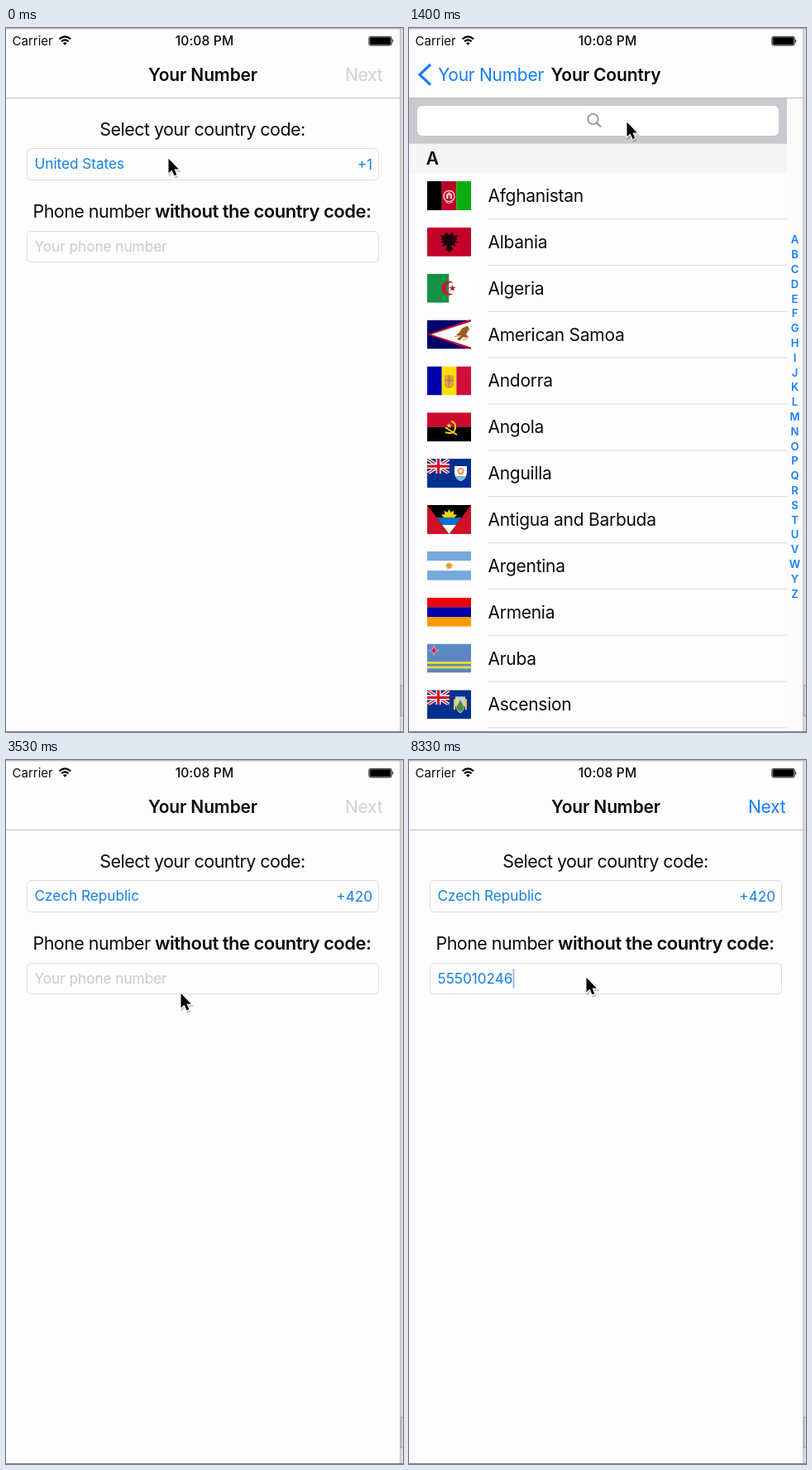
Recreate the animation shown at these times as an HTML page. Size 480 by 850 pixels, loop 8390 ms.

```html
<!DOCTYPE html>
<html lang="en">
<head>
<meta charset="utf-8">
<title>Country picker</title>
<style>
html, body { margin: 0; width: 100%; height: 100%; overflow: hidden; background: #fefdfe; }
svg { display: block; width: 100vw; height: 100vh; }
text { font-family: Inter, "Liberation Sans", sans-serif; fill: #0b0b0c; white-space: pre; }
.row { font-size: 21px; letter-spacing: -.28px; }
.title { font-size: 21px; font-weight: 600; letter-spacing: -.15px; text-anchor: middle; }
.label { font-size: 21.5px; letter-spacing: -.55px; }
.bold { font-size: 22px; font-weight: 600; letter-spacing: -.5px; }
.field { font-size: 17.15px; }
.blue { fill: #147efb; }
.value { fill: #1480e4; }
.end { text-anchor: end; }
.mid { text-anchor: middle; }
.index { font-size: 13px; font-weight: 600; text-anchor: middle; fill: #147efb; }
.line { stroke: #dfe0e4; stroke-width: 1.2; }
</style>
</head>
<body>
<svg viewBox="0 0 480 850" preserveAspectRatio="none">
  <defs>
    <clipPath id="view"><rect y="84" width="477" height="766"/></clipPath>
    <clipPath id="flagBox"><rect width="53" height="35"/></clipPath>
    <clipPath id="jackBox"><rect width="27" height="18"/></clipPath>
    <g id="jack" clip-path="url(#jackBox)">
      <path d="M0 0L27 18M27 0L0 18" stroke="#fff" stroke-width="4"/>
      <path d="M0 0L27 18M27 0L0 18" stroke="#cf142b" stroke-width="1.4"/>
      <path d="M13.5 0V18M0 9H27" stroke="#fff" stroke-width="6"/>
      <path d="M13.5 0V18M0 9H27" stroke="#cf142b" stroke-width="3.4"/>
    </g>
  </defs>
  <rect width="480" height="850" fill="#fefdfe"/>

  <g clip-path="url(#view)">
    <g id="form">
      <text class="label mid" x="237.5" y="130">Select your country code:</text>
      <rect x="25.5" y="145.5" width="425" height="38" rx="5" fill="none" stroke="#dcdee2"/>
      <text id="country" class="field value" x="34.5" y="170"></text>
      <text id="code" class="field value end" x="443" y="170.5"></text>
      <text class="label" x="32.5" y="229">Phone number</text>
      <text class="bold end" x="441.5" y="229">without the country code:</text>
      <rect x="25.5" y="245.5" width="425" height="37" rx="5" fill="none" stroke="#dcdee2"/>
      <text id="hint" class="field" x="34.5" y="270" style="fill:#c9c9ce">Your phone number</text>
      <text id="phone" class="field" x="34.5" y="270"></text>
      <rect id="phoneCaret" y="252" width="2" height="23" fill="#426fd9"/>
    </g>
    <rect id="dim" y="84" width="477" height="766"/>

    <g id="panel">
      <rect y="84" width="477" height="766" fill="#fefdfe"/>
      <rect x="457" y="84" width="20" height="766" fill="#fcfcfd"/>
      <rect id="bar" y="84" height="55.5" fill="#c9c8ce"/>
      <rect id="box" x="10" y="94" height="36" rx="6" fill="#fff"/>
      <g id="lens" fill="none" stroke="#8e8e93" stroke-width="1.5">
        <circle cx="-1.5" cy="110" r="6.2"/><path d="M3 114.5L8 119.5" stroke-width="1.9"/>
      </g>
      <text id="query" class="field" x="47" y="117.5"></text>
      <rect id="queryCaret" y="99" width="2" height="24" fill="#426fd9"/>
      <g id="clear">
        <circle cx="346.5" cy="112" r="9" fill="#8e8e93"/>
        <path d="M343 108.5l7 7m0-7l-7 7" stroke="#fff" stroke-width="1.7"/>
      </g>
      <text id="cancel" class="row blue" x="380" y="118">Cancel</text>
      <path d="M0 139.5H457" stroke="#d4d4d8"/>
      <rect y="140" width="457" height="35" fill="#f5f5f6"/>
      <g id="all"></g>
      <g id="found"></g>
    </g>
  </g>

  <rect width="477" height="84" fill="#fdfdfe"/>
  <path d="M0 84.5H477" stroke="#bcbcc0"/>
  <text id="title" class="title" y="63.5">Your Number</text>
  <text id="title2" class="title" y="63.5">Your Country</text>
  <text id="back" class="row blue" y="63.5">Your Number</text>
  <path id="chevron" d="M26 44L13 56.3L26 68.6" fill="none" stroke="#147efb" stroke-width="3.2"/>
  <text id="next" class="row end" x="455.3" y="63.5">Next</text>

  <text x="7.6" y="21" font-size="15">Carrier</text>
  <text class="mid" x="240" y="21" font-size="15.6" font-weight="500" letter-spacing=".15">10:08 PM</text>
  <g fill="none" stroke="#000" stroke-width="2.1">
    <path d="M64.5 13.4Q71.3 7.2 78.1 13.4M67 16.3Q71.3 12.4 75.6 16.3"/>
    <path d="M71.3 20.8L68.9 18.2Q71.3 16.2 73.7 18.2Z" fill="#000" stroke="none"/>
  </g>
  <rect x="438.8" y="10.3" width="27.4" height="10.8" rx="2" fill="#777" stroke="#333" stroke-width=".9"/>
  <rect x="440.3" y="11.6" width="24.4" height="8.2" rx=".8"/>
  <path d="M467.3 13.3Q469.4 15.7 467.3 18.1Z"/>

  <rect x="477" width="3" height="850" fill="#dedee0"/>
  <path d="M476.8 0V850" stroke="#b9b9bc" stroke-width="1.2"/>
  <rect x="477.4" y="793.5" width="4" height="37" fill="#d2d2d4" stroke="#a5a5a8"/>
  <path d="M0 .7H480" stroke="#bdbdc0" stroke-width="1.4"/>
  <path d="M0 849.5H480" stroke="#86868a"/>

  <g id="cursor">
    <path d="M1.5 3V20.5L5.5 16.8L8.5 23.5L11.3 22.3L8.5 15.8H13.8Z" opacity=".22" stroke="#000" stroke-width="2"/>
    <path d="M.5 .8V18.3L4.5 14.6L7.5 21.3L10.3 20.1L7.5 13.6H12.8Z" stroke="#fff" stroke-width="2.4" stroke-linejoin="round" paint-order="stroke"/>
  </g>
</svg>
<script>
const el = {};
document.querySelectorAll('[id]').forEach(n => el[n.id] = n);
const set = (n, attrs) => { for (const k in attrs) n.setAttribute(k, attrs[k]); };
const clamp = v => Math.max(0, Math.min(1, v));
const mix = (a, b, p) => a + (b - a) * p;

// Flags, drawn on 53 x 35
const rect = (x, y, w, h, c) => `<rect x="${x}" y="${y}" width="${w}" height="${h}" fill="${c}"/>`;
const path = (d, c, more = '') => `<path d="${d}" fill="${c}" ${more}/>`;
const dot = (x, y, r, c, more = '') => `<circle cx="${x}" cy="${y}" r="${r}" fill="${c}" ${more}/>`;
const stroke = (c, w) => `stroke="${c}" stroke-width="${w}"`;
const bands = (...c) => c.map((v, i) => rect(0, i * 35 / c.length, 53, 35 / c.length + .1, v)).join('');
const pales = (...c) => c.map((v, i) => rect(i * 53 / c.length, 0, 53 / c.length + .1, 35, v)).join('');
const star = (x, y, r, n, c, inner = .4) => {
  let d = '';
  for (let i = 0; i < 2 * n; i++) {
    const a = Math.PI * i / n - Math.PI / 2, k = i % 2 ? r * inner : r;
    d += (i ? 'L' : 'M') + (x + k * Math.cos(a)).toFixed(2) + ' ' + (y + k * Math.sin(a)).toFixed(2);
  }
  return path(d + 'Z', c);
};
const ensign = shield => rect(0, 0, 53, 35, '#00308f') + '<use href="#jack"/>' + shield;

const flags = {
  'Afghanistan': pales('#000', '#be0027', '#0bae0f') +
    dot(26.5, 18, 6.6, 'none', stroke('#eec6cb', 1.5)) + path('M23 21V16L26.5 13L30 16V21Z', '#eec6cb') +
    rect(25.5, 17, 2, 4, '#be0027') + path('M22 25Q26.5 28 31 25', 'none', stroke('#eec6cb', 1)),
  'Albania': rect(0, 0, 53, 35, '#c20029') +
    path('M26.5 9L23 6L20 9L24 11L16 9L18 13L16 14L19 16L16 18L20 19L18 23L24 21L22 27L26.5 30L31 27L29 21L35 23L33 19L37 18L34 16L37 14L35 13L37 9L29 11L33 9L30 6Z', '#200008'),
  'Algeria': pales('#149048', '#fff') +
    path('M32 11.2A8.6 8.6 0 1 0 32 23.8A6.8 6.8 0 1 1 32 11.2Z', '#d21034') + star(30.5, 17.5, 4.4, 5, '#d21034'),
  'American Samoa': rect(0, 0, 53, 35, '#00006b') + path('M0 17.5L53 -1V36Z', '#c0102f') + path('M5 17.5L53 2V33Z', '#fff') +
    path('M35 18L39 15L42 10L49 7L51 11L47 17L50 21L43 21L39 25L36 23L40 20Z', '#9b5a22') +
    path('M33 20L42 19M43 24L49 22', 'none', stroke('#d9a33c', 1.3)),
  'Andorra': pales('#0000a8', '#fedf00', '#d0103a') + rect(21, 11, 11, 12, '#d9a04e') +
    path('M21 17H32M26.5 11V25M22 23Q26.5 28 31 23', 'none', stroke('#b87839', 1.4)),
  'Angola': bands('#cc092f', '#000') +
    path('M29 10.5A7.5 7.5 0 0 1 28 25L22 24M22 18L36 27', 'none', stroke('#f7d117', 2)) + star(26.5, 16, 3.6, 5, '#f7d117'),
  'Anguilla': ensign(path('M33 9H48V17Q47 25 40.5 27Q34 25 33 17Z', '#fff') + path('M34 21H47Q45 25 40.5 26.5Q36 25 34 21Z', '#72bfd5') +
    dot(40.5, 15, 3.2, 'none', stroke('#f08a45', 1.9))),
  'Antigua and Barbuda': rect(0, 0, 53, 35, '#ce1126') + path('M0 0H53L26.5 35Z', '#000') +
    star(26.5, 15, 10, 10, '#fcd116', .65) + path('M11.4 15H41.6L34 25H19Z', '#0072c6') + path('M18.2 24H34.8L26.5 35Z', '#fff'),
  'Argentina': bands('#75aadb', '#fff', '#75aadb') + star(26.5, 17.5, 5, 12, '#e8b54a', .65) + dot(26.5, 17.5, 2.4, '#d79b3c'),
  'Armenia': bands('#f00000', '#0000aa', '#ff9a00'),
  'Aruba': rect(0, 0, 53, 35, '#5b87c5') + rect(0, 21.5, 53, 2.8, '#f3dc27') + rect(0, 27, 53, 2.8, '#f3dc27') +
    star(8, 8, 6.2, 4, '#fff') + star(8, 8, 5, 4, '#dd1c3c'),
  'Ascension': ensign(path('M34 8H46V18Q45 25 40 28Q35 25 34 18Z', '#c9d3c7') + path('M35 21L40 12L45 21Q43 25 40 27Q37 25 35 21Z', '#4e8d42') +
    path('M33 11V24M47 11V24', 'none', stroke('#e6c437', 2))),
  'Czech Republic': bands('#fff', '#d00c27') + path('M0 0L26.5 17.5L0 35Z', '#1c4279') +
    `<rect x=".3" y=".3" width="52.4" height="34.4" fill="none" stroke="#000" stroke-opacity=".15" stroke-width=".6"/>`
};
const row = (name, i) => {
  const y = 175 + i * 55.85;
  return `<g transform="translate(22 ${y + 10})" clip-path="url(#flagBox)">${flags[name]}</g>` +
    `<text class="row" x="95.5" y="${y + 35}">${name}</text>` + line(95.5, i);
};
const line = (x, i) => `<path class="line" d="M${x} ${230.6 + i * 55.85}H457"/>`;
const head = c => `<text class="title" x="28.3" y="165">${c}</text>`;
const index = (c, y) => `<text class="index" x="466.5" y="${y + 4.8}">${c}</text>`;

const names = Object.keys(flags), pick = names.pop();
el.all.innerHTML = head('A') + names.map(row).join('') +
  [...'ABCDEFGHIJKLMNOPQRSTUVWYZ'].map((c, i) => index(c, 255.5 + i * 17.8)).join('');
el.found.innerHTML = head('C') + row(pick, 0) +
  Array.from({ length: 11 }, (_, i) => line(20, i + 1)).join('') + index('C', 466);

// Timing, in ms
const LOOP = 8390, PUSH = 525, SEARCH = 1530, POP = 2930, SLIDE = 500, FOCUS = 4060;
const queryKeys = [2070, 2260];
const phoneKeys = [4270, 4400, 4600, 5530, 5730, 6000, 7130, 7400, 7750];
const NUMBER = '555010246';
const moves = [
  [0, 196, 157], [250, 196, 157], [600, 185, 161], [800, 185, 161], [1300, 263, 113], [1850, 263, 113],
  [2550, 243, 197], [2980, 243, 197], [3480, 211, 281], [3600, 211, 281], [3950, 214, 262], [LOOP, 214, 262]
];

const cubic = (a, b, u) => 3 * (1 - u) * (1 - u) * u * a + 3 * (1 - u) * u * u * b + u * u * u;
function slide(v) {
  if (v <= 0 || v >= 1) return clamp(v);
  let lo = 0, hi = 1;
  for (let i = 0; i < 24; i++) {
    const u = (lo + hi) / 2;
    if (cubic(.36, .04, u) < v) lo = u; else hi = u;
  }
  return cubic(.66, 1, lo);
}
const smooth = v => (v = clamp(v), v * v * (3 - 2 * v));

function pointer(t) {
  const i = Math.max(1, moves.findIndex(m => m[0] > t));
  const [t0, x0, y0] = moves[i - 1], [t1, x1, y1] = moves[i];
  const p = smooth((t - t0) / (t1 - t0));
  return [mix(x0, x1, p), mix(y0, y1, p)];
}
// Caret stays lit after each key, then fades out and in
function blink(t, start, keys) {
  if (t < start) return 0;
  const age = (t - Math.max(start, ...keys.filter(k => k <= t))) % 1000;
  return age < 500 ? 1 : age < 850 ? clamp(1 - (age - 500) / 160) : (age - 850) / 150;
}
const typed = (s, keys, t) => s.slice(0, keys.filter(k => k <= t).length);
const endOf = n => n.textContent ? n.getComputedTextLength() : 0;

function draw(t) {
  const p = t < POP ? slide((t - PUSH) / SLIDE) : 1 - slide((t - POP) / SLIDE);
  const s = smooth((t - SEARCH) / 280), chosen = t >= POP - 60;

  set(el.form, { transform: `translate(${-143 * p} 0)` });
  set(el.dim, { opacity: .1 * p });
  set(el.panel, { transform: `translate(${477 * (1 - p)} 0)`, display: p > 0 ? 'inline' : 'none' });

  set(el.title, { x: mix(238, 98, p), opacity: clamp(1 - p * 1.5) });
  set(el.title2, { x: mix(584, 238, p), opacity: p });
  set(el.back, { x: mix(190, 35, p), opacity: p });
  set(el.chevron, { opacity: clamp((p - .75) / .25) });

  set(el.bar, { width: mix(457, 477, s) });
  set(el.box, { width: mix(437, 356, s) });
  set(el.lens, { transform: `translate(${mix(224, 28.5, s)} 0)` });
  set(el.cancel, { x: mix(460, 380, s), opacity: s });
  const query = typed('Cz', queryKeys, t), hit = query.length > 1;
  el.query.textContent = query;
  set(el.clear, { opacity: query ? 1 : 0 });
  set(el.queryCaret, { x: 47 + endOf(el.query), opacity: blink(t, SEARCH + 280, queryKeys) });
  set(el.all, { display: hit ? 'none' : 'inline' });
  set(el.found, { display: hit ? 'inline' : 'none' });

  el.country.textContent = chosen ? pick : 'United States';
  el.code.textContent = chosen ? '+420' : '+1';
  const phone = typed(NUMBER, phoneKeys, t), valid = phone.length === NUMBER.length;
  el.phone.textContent = phone;
  el.phone.style.fill = valid ? '#1480e4' : '#d0021b';
  set(el.hint, { opacity: phone ? 0 : 1 });
  set(el.phoneCaret, { x: 34.5 + endOf(el.phone), opacity: blink(t, FOCUS, phoneKeys) });
  el.next.style.fill = valid ? '#147efb' : '#d0d0d4';
  set(el.next, { opacity: clamp(1 - p * 1.6) });

  set(el.cursor, { transform: `translate(${pointer(t)})` });
}

const start = performance.now();
function tick() {
  const ms = (performance.now() - start) % LOOP;
  draw(Math.floor((ms + 4) * .015) / .015); // 15 pictures a second
  requestAnimationFrame(tick);
}
draw(0);
tick();
</script>
</body>
</html>
```
